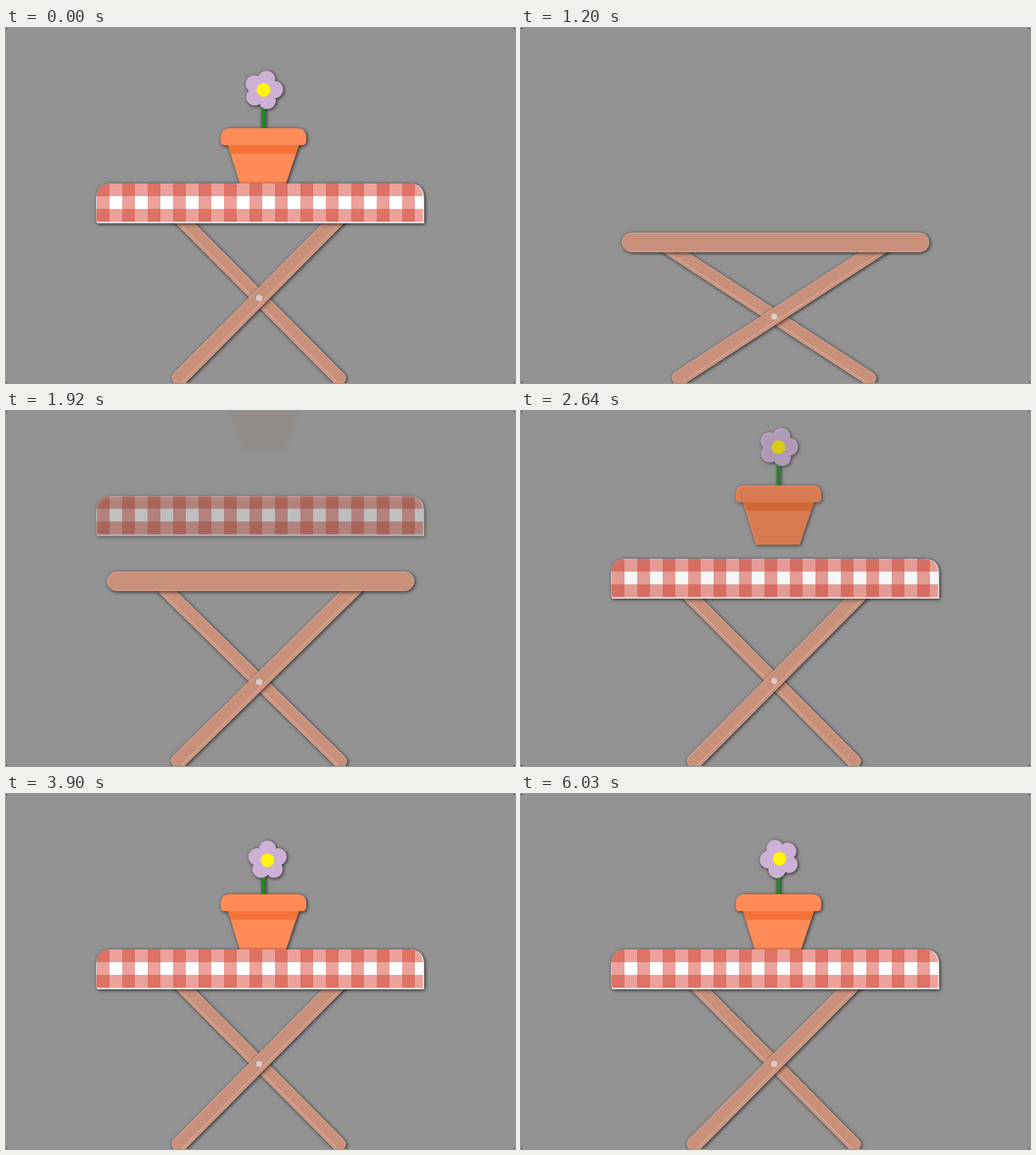
Write an HTML page that moves like this. It is 600 px wide and 418 px high and loops after 6.06 s.

```html
<!DOCTYPE html>
<html lang="en">
<head>
<meta charset="utf-8">
<title>Picnic table</title>
<style>
  html, body { margin: 0; width: 100%; height: 100%; overflow: hidden; background: #3a3a3a; }
  svg { display: block; width: 600px; height: 418px; background: #939393; border-radius: 3px; }
  .shade { filter: drop-shadow(1px 1px 2px rgba(0, 0, 0, .77)); }
  .wood { fill: #c9907b; stroke: #d9a997; stroke-width: 1; }
  .grain { stroke: #dcac9a; stroke-width: 1; }
</style>
</head>
<body>
<svg viewBox="0 0 600 418">
  <defs>
    <pattern id="check" x="107" y="183" width="30" height="30" patternUnits="userSpaceOnUse">
      <rect width="30" height="30" fill="#fff"/>
      <rect width="15" height="30" fill="#eca19a"/>
      <rect width="30" height="15" fill="#eca19a"/>
      <rect width="15" height="15" fill="#dd7265"/>
    </pattern>
  </defs>

  <g id="table">
    <g class="shade">
      <g id="back">
        <rect class="wood" x="-141" y="-7.5" width="307" height="15" rx="7"/>
        <path class="grain" d="M-134 5H162"/>
      </g>
    </g>
    <g class="shade">
      <g id="front">
        <rect class="wood" x="-141" y="-8.5" width="307" height="17" rx="7"/>
        <path class="grain" d="M-134 5.5H162"/>
      </g>
    </g>
    <circle id="rivet" cx="298.5" r="3.6" fill="#d8cfcb"/>
    <g class="shade"><rect id="top" class="wood" x="119.5" width="361.5" height="22" rx="11"/></g>
  </g>

  <g id="plant" class="shade">
    <g>
      <path d="M303.5 120V76" stroke="#23862a" stroke-width="4.5"/>
      <g id="flower"></g>
      <path d="M261 136H346L328.5 188H277Z" fill="#ff8b58"/>
      <path d="M261.5 137H345.5L342 148H265Z" fill="#f47235"/>
      <path d="M264 118H343Q354 118 354 129V133Q354 138 349 138H258Q253 138 253 133V129Q253 118 264 118Z" fill="#ff8b58"/>
    </g>
  </g>

  <g id="cloth" class="shade">
    <g>
      <path d="M124 183H475Q493 183 493 201V230H109Q106.5 230 106.5 226V201Q106.5 183 124 183Z" fill="#f1dfe0"/>
      <path d="M124 183H474Q491.5 183 491.5 201V228H109Q106.5 228 106.5 225V201Q106.5 183 124 183Z" fill="url(#check)"/>
    </g>
  </g>
</svg>
<script>
const LOOP = 6060;
const $ = id => document.getElementById(id);
const clamp = v => Math.min(1, Math.max(0, v));

// Cubic timing curve, solved by bisection
function bezier(x1, y1, x2, y2) {
  const at = (a, b, s) => 3 * a * s * (1 - s) ** 2 + 3 * b * s * s * (1 - s) + s ** 3;
  return x => {
    let lo = 0, hi = 1;
    for (let i = 0; i < 24; i++) {
      const mid = (lo + hi) / 2;
      if (at(x1, x2, mid) < x) lo = mid; else hi = mid;
    }
    return at(y1, y2, lo);
  };
}
const ease = bezier(.25, .1, .25, 1);
const easeOut = bezier(0, 0, .58, 1);
const progress = (t, start, length) => clamp((t - start) / length);

function addCircle(x, y, r, fill) {
  const c = document.createElementNS('http://www.w3.org/2000/svg', 'circle');
  Object.entries({ cx: x, cy: y, r, fill }).forEach(([k, v]) => c.setAttribute(k, v));
  $('flower').append(c);
}
for (let i = 0; i < 5; i++) {
  const a = (16 + 72 * i) * Math.PI / 180;
  addCircle(303.5 + 13 * Math.sin(a), 73 - 13 * Math.cos(a), 10.3, '#cdb1d5');
}
addCircle(303.5, 73, 11, '#cdb1d5');
addCircle(303.5, 73, 8, '#fff30a');

// The feet stay on the ground while the legs open
function poseTable(p) {
  const angle = 45.2 * p;
  const pivot = 412.2 - 133 * Math.sin(angle * Math.PI / 180);
  const move = `translate(298.5 ${pivot})`;
  $('back').setAttribute('transform', `${move} rotate(${180 + angle}) scale(1 -1)`);
  $('front').setAttribute('transform', `${move} rotate(${-angle})`);
  $('rivet').setAttribute('cy', pivot);
  $('top').setAttribute('y', 242 + (pivot - 340) * 2.5);
}

// The shadow belongs to the group, so it shows through the fading content
function drop(id, height, p) {
  $(id).setAttribute('transform', `translate(0 ${-height * (1 - p)})`);
  $(id).firstElementChild.setAttribute('opacity', p);
}

function draw(t) {
  const settled = t < 30;
  poseTable(settled ? 1 : easeOut(progress(t, 115, 2000)));
  drop('cloth', 230, settled ? 1 : ease(progress(t, 1219, 1890)));
  drop('plant', 150, settled ? 1 : ease(progress(t, 1805, 1690)));
  const turns = Math.max(0, t - 3057) / 1850;
  $('flower').setAttribute('transform', `rotate(${360 * ease(turns % 1)} 308.5 73)`);
}

const begin = performance.now();
function tick() {
  draw((performance.now() - begin) % LOOP);
  requestAnimationFrame(tick);
}
draw(0);
requestAnimationFrame(tick);
</script>
</body>
</html>
```
